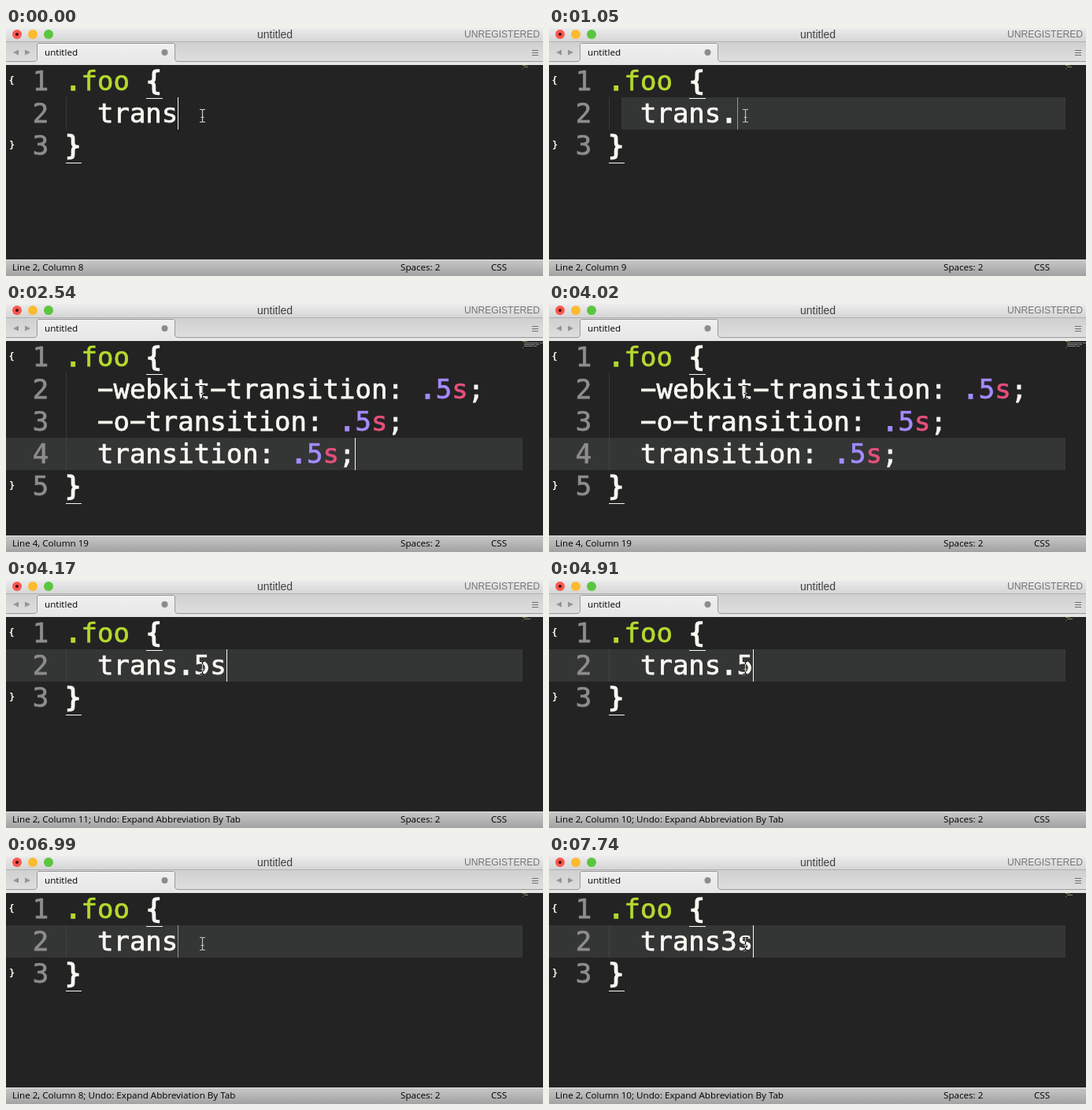
Recreate the animation shown at these times as an HTML page. Size 682 px wide and 315 px high, loop 8 s.

```html
<!DOCTYPE html>
<html lang="en">
<head>
<meta charset="utf-8">
<title>Editor</title>
<style>
  html, body { margin: 0; width: 100%; height: 100%; overflow: hidden; background: #232323; }
  svg { display: block; width: 682px; height: 315px; }
  text { white-space: pre; }
  .ui { font: 11.65px "Open Sans", "Noto Sans", sans-serif; fill: #000; }
  .title { font: 14px "Liberation Sans", Arial, sans-serif; fill: #404040; }
  .code { font: 34px "DejaVu Sans Mono", Menlo, monospace; fill: #f8f8f2; stroke: #f8f8f2; stroke-width: .75; }
  .code .sel { fill: #b4d930; stroke: #b4d930; }
  .code .num { fill: #a48bff; stroke: #a48bff; }
  .code .unit { fill: #e5507c; stroke: #e5507c; }
  .code .heavy { stroke-width: 1.7; }
  .code.line { fill: #8d8d8d; stroke: #8d8d8d; }
  .fold { font: bold 12px "DejaVu Sans Mono", monospace; fill: #f8f8f4; }
  .beam { fill: none; stroke: #f4f4f4; stroke-width: 1.2; mix-blend-mode: difference; }
</style>
</head>
<body>
<svg viewBox="0 0 682 315">
  <defs>
    <linearGradient id="bar" x2="0" y2="1">
      <stop stop-color="#ececec"/><stop offset="1" stop-color="#d4d4d4"/>
    </linearGradient>
    <linearGradient id="strip" x2="0" y2="1">
      <stop stop-color="#d0d0d0"/><stop offset="1" stop-color="#dfdfdf"/>
    </linearGradient>
    <linearGradient id="tab" x2="0" y2="1">
      <stop stop-color="#f0f0f0"/><stop offset="1" stop-color="#e6e6e6"/>
    </linearGradient>
    <linearGradient id="foot" x2="0" y2="1">
      <stop stop-color="#c8c8c8"/><stop offset="1" stop-color="#a2a2a2"/>
    </linearGradient>
  </defs>

  <rect y="46" width="682" height="248" fill="#232323"/>
  <g id="doc"></g>
  <rect id="caret" width="1" height="41" fill="#f8f8f0"/>
  <path class="beam" d="M246 103.5h2.500l1 1 1-1h2.500M249.500 104v15M246 119.500h2.500l1-1 1 1h2.500M247.500 113.500h4"/>

  <rect width="682" height="18" fill="url(#bar)"/>
  <rect y="17" width="682" height="1" fill="#b0b0b0"/>
  <rect y="18" width="682" height="26" fill="url(#strip)"/>
  <path d="M0 47V43.5H35Q39.5 43.5 39.5 39V21L41 19.5H213L214.5 21V39Q214.5 43.5 219 43.5H682V47Z" fill="url(#tab)"/>
  <path d="M0 42.5H35Q39.5 42.5 39.5 39V21L41 19.5H213L214.5 21V39Q214.5 42.5 219 42.5H682" fill="none" stroke="#999"/>
  <circle cx="14" cy="8" r="6" fill="#fa5850"/>
  <circle cx="34" cy="8" r="6" fill="#fbbb30"/>
  <circle cx="54" cy="8" r="6" fill="#5ac640"/>
  <circle cx="14" cy="8" r="2" fill="#4c0a07"/>
  <text class="title" x="319" y="13">untitled</text>
  <text class="title" x="582" y="12" style="font-size:12.1px;fill:#757575">UNREGISTERED</text>
  <path d="M16 27.500v7l-7-3.500zM24 27.500v7l7-3.500z" fill="#949494"/>
  <text class="ui" x="49" y="35">untitled</text>
  <circle cx="201.500" cy="31" r="4" fill="#8c8c8c"/>
  <path d="M668 28.500h8M668 31.500h8M668 34.500h8" stroke="#6e6e6e"/>

  <rect y="294" width="682" height="21" fill="url(#foot)"/>
  <rect y="294" width="682" height="1" fill="#e4e4e4"/>
  <text class="ui" id="status" x="8" y="308"></text>
  <text class="ui" x="501" y="308">Spaces: 2</text>
  <text class="ui" x="616" y="308">CSS</text>
</svg>

<script>
const LOOP = 8000, TOP = 47, ROW = 41, LEFT = 75, CHAR = 20.47;
const UNDO_AT = 4170;
const FULL = 'transition: .5s;';

// time, text before the caret, caret opacity
const steps = [
  [0, 'trans', 1], [300, 'trans', .5], [450, 'trans', 0],
  [750, 'trans.', 1], [1050, 'trans.', .5], [1200, 'trans.', 0],
  [1650, 'trans.5', .5], [1790, 'trans.5', 1], [2090, 'trans.5s', 1],
  [2540, FULL, 1], [2840, FULL, .5], [2980, FULL, 0],
  [3580, FULL, 1], [3880, FULL, .5], [4020, FULL, 0],
  [4170, 'trans.5s', 1], [4610, 'trans.5s', .5], [4760, 'trans.5s', 0],
  [4900, 'trans.5', 1], [5050, 'trans.', 1], [5350, 'trans.', .5], [5500, 'trans.', 0],
  [6100, 'trans.', 1], [6400, 'trans.', .5], [6540, 'trans.', 0],
  [6990, 'trans', .5], [7140, 'trans', 1], [7590, 'trans3', 1], [7740, 'trans3s', 1]
];

const doc = document.getElementById('doc');
const caret = document.getElementById('caret');
const status = document.getElementById('status');

const rect = (x, y, w, h, fill) =>
  `<rect x="${x}" y="${y}" width="${w}" height="${h}" fill="${fill}"/>`;
const text = (cls, x, y, body) => `<text class="${cls}" x="${x}" y="${y}">${body}</text>`;
const span = (cls, body) => `<tspan class="${cls}">${body}</tspan>`;

function colour(line) {
  return line
    .replace(/[.{}]/g, c => span('heavy', c))
    .replace(/(<.*>)foo/, (all) => span('sel', all))
    .replace(/: (<.*>)5s/, (all, dot) => ': ' + span('num', dot + '5') + span('unit', 's'));
}

function minimap(line, i) {
  return [...line.matchAll(/\S+/g)].map(m =>
    rect(656 + m.index, 47 + 2 * i, m[0].length, 1, m[0] === '.foo' ? '#7d9436' : '#85857f')
  ).join('');
}

function drawDoc(typed, hiLeft) {
  const inner = typed === FULL ? ['−webkit−' + FULL, '−o−' + FULL, FULL] : [typed];
  const lines = ['.foo {', ...inner.map(s => '  ' + s), '}'];
  const last = lines.length - 1;
  const rowTop = i => TOP + ROW * i;
  let out = hiLeft === null ? '' : rect(hiLeft, rowTop(last - 1), 656 - hiLeft, ROW, '#343535');
  out += `<path d="M76.500 ${rowTop(1)}V${rowTop(last)}" stroke="#505050" stroke-dasharray="1 1"/>`;
  lines.forEach((line, i) => {
    out += text('code line', 33.8, rowTop(i) + 32, i + 1);
    out += text('code', LEFT, rowTop(i) + 32, colour(line));
    out += minimap(line, i);
  });
  out += rect(178, rowTop(1) + 1, 21, 1, '#f8f8f2') + rect(76, rowTop(last) + ROW + 1, 20, 1, '#f8f8f2');
  out += text('fold', 3.5, 71, '{') + text('fold', 4, rowTop(last) + 24, '}');
  doc.innerHTML = out;
  return last;
}

let shown = -1;
function show(n) {
  const [time, typed, alpha] = steps[n];
  const hiLeft = time < 750 ? null : time < 2540 ? 92 : 0;
  const row = drawDoc(typed, hiLeft);
  caret.setAttribute('x', Math.round(LEFT + CHAR * (typed.length + 2)));
  caret.setAttribute('y', TOP + ROW * (row - 1));
  caret.setAttribute('opacity', alpha);
  status.textContent = `Line ${row}, Column ${typed.length + 3}` +
    (time >= UNDO_AT ? '; Undo: Expand Abbreviation By Tab' : '');
}

const start = performance.now();
function tick() {
  const t = (performance.now() - start) % LOOP;
  const n = steps.findLastIndex(s => s[0] <= t);
  if (n !== shown) show(shown = n);
  requestAnimationFrame(tick);
}
tick();
</script>
</body>
</html>
```
